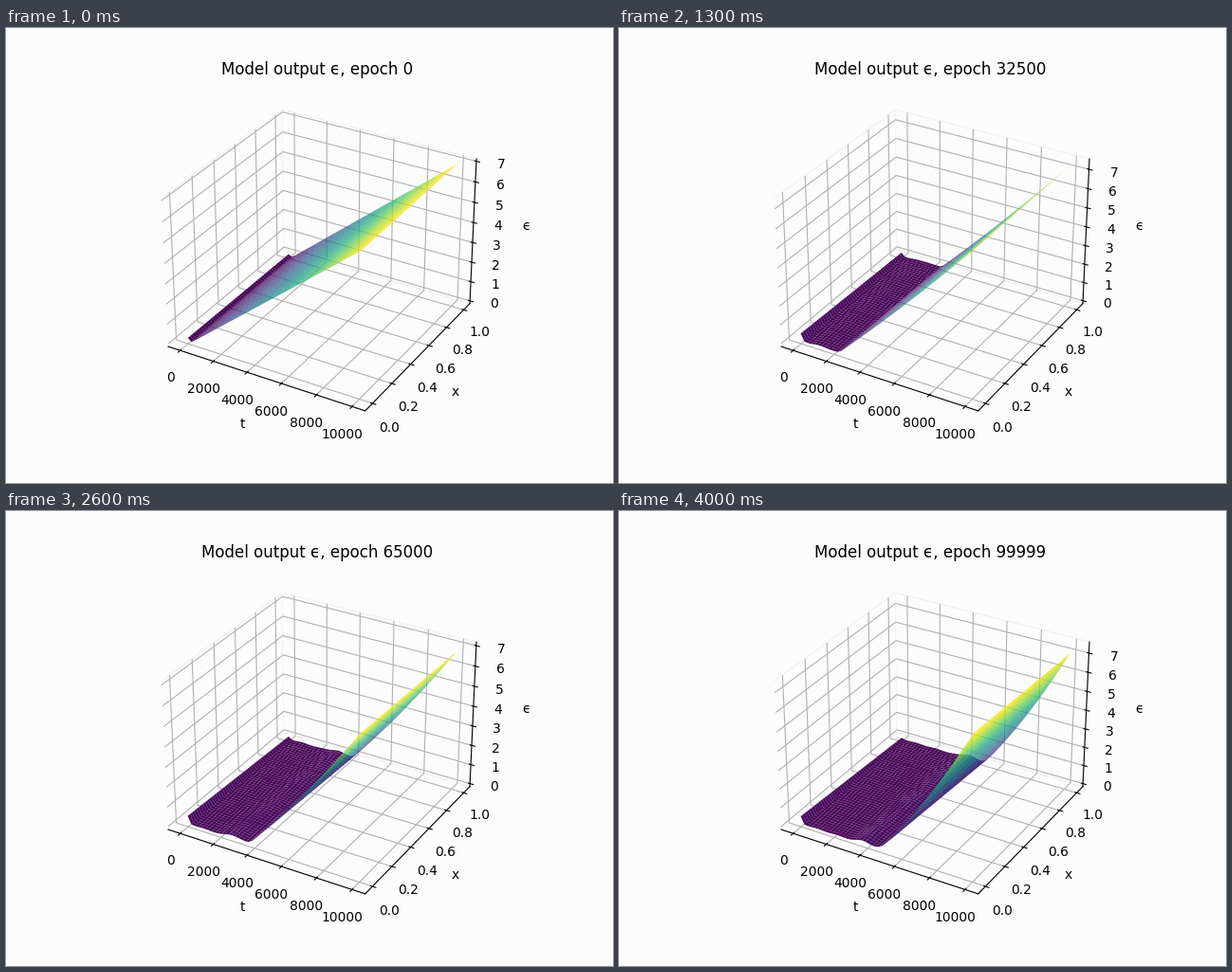
Write a matplotlib script that moves like this. It is 640x480 px and loops after 4.1 s.

```python
import numpy as np
import matplotlib.pyplot as plt
from matplotlib.animation import FuncAnimation

FRAMES = 41
BACK = "#fcfcfc"
plt.rcParams.update({"figure.facecolor": BACK, "axes.facecolor": BACK})

fig = plt.figure(figsize=(6.4, 4.8), dpi=100)
ax = fig.add_subplot(projection="3d")
T, X = np.meshgrid(np.linspace(0, 10000, 50), np.linspace(0, 1, 50))


def softplus(d, width):
    return width * np.logaddexp(0, d / width)


def end_value(i):
    """Output at the last t: it drifts, and tilts down along x."""
    near = np.interp(i, [0, 8, 21, 26, 40], [6.92, 7.44, 7.28, 7.04, 7.42])
    return near + (0.05 - 0.0097 * i) * X


def model(i):
    """Flat floor up to a kink that settles with training, then a ramp."""
    kink = (220 + 6600 * (1 - np.exp(-i / 35))) * (1 + 0.1 * X)
    width = 25 + 3 * i
    ramp = softplus(T - kink, width) / softplus(10000 - kink, width)
    bend = 0.005 * i
    ramp *= 1 - bend + bend * ramp
    hump = (0.02 + 0.004 * i) * np.exp(-((T - kink + 950) / 520) ** 2)
    hump *= 1 + 0.2 * np.sin(20 * X + 0.3 * i)
    spike = (0.4 - 0.25 * np.exp(-i / 4)) * (1 - (0.4 + 0.012 * i) * X)
    ripple = 0.015 * (0.4 - np.sin(T / 200)) * (T < kink)
    return end_value(i) * ramp + hump + spike * np.exp(-T / 80) + ripple


def draw(i):
    ax.clear()
    for axis in (ax.xaxis, ax.yaxis, ax.zaxis):
        axis.set_pane_color((0.988, 0.988, 0.988, 1))
        axis.pane.set_edgecolor((0.95, 0.95, 0.95, 1))
    ax.plot_surface(T, X, model(i), cmap="viridis")
    ax.set_title(f"Model output \u03f5, epoch {min(i * 2500, 99999)}")
    ax.set_xlabel("t")
    ax.set_ylabel("x")
    ax.set_zlabel("\u03f5")


anim = FuncAnimation(fig, draw, frames=FRAMES, interval=100, repeat=True)
plt.show()
```
